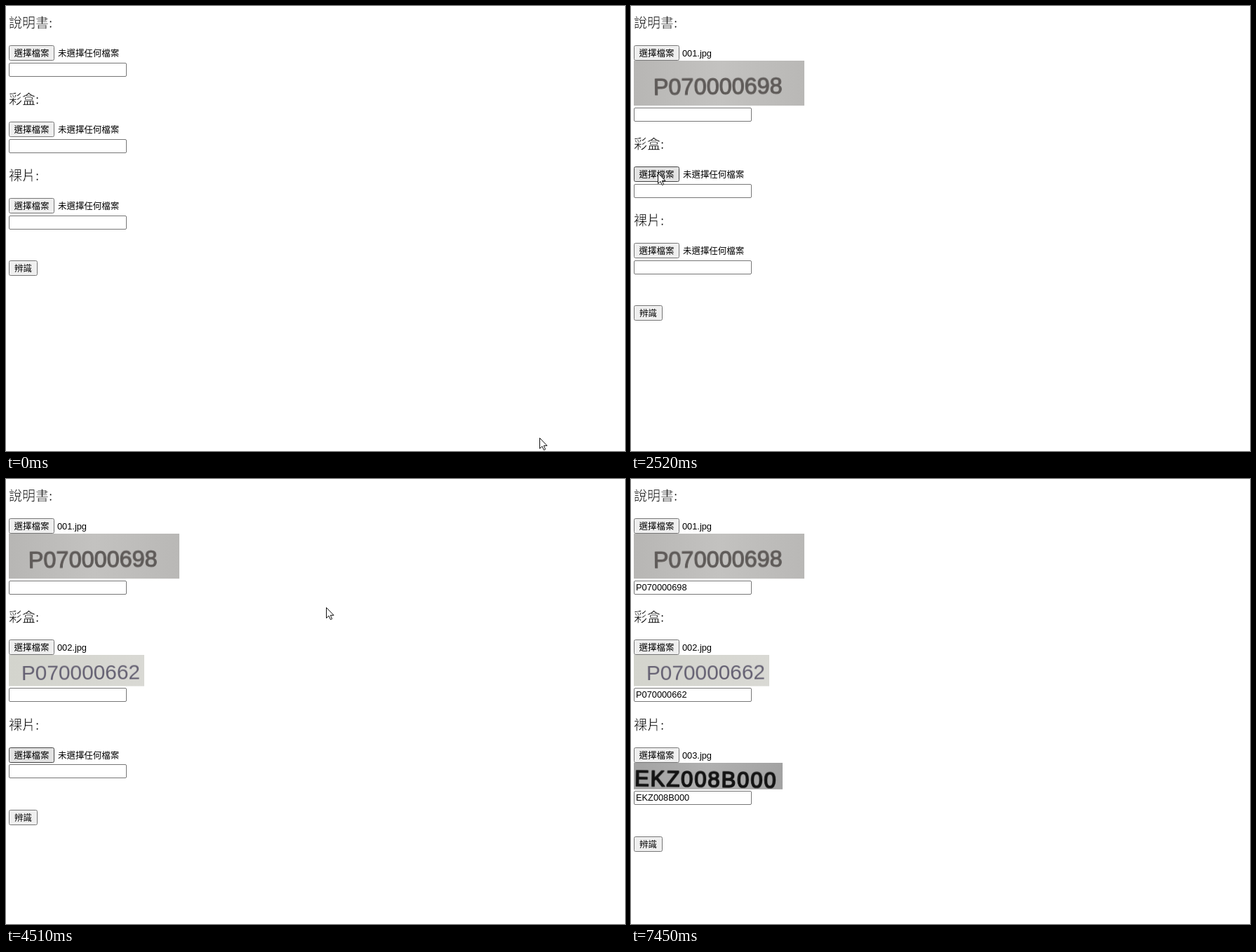
Write an HTML page that moves like this. It is 882x635 px and loops after 8.16 s.

```html
<!DOCTYPE html>
<html lang="zh-Hant">
<head>
<meta charset="utf-8">
<style>
  html, body { margin: 0; width: 100%; height: 100%; overflow: hidden; background: #fff; }
  svg { display: block; width: 882px; height: 635px; }
  text { white-space: pre; }
  .page { font: 12.8px "Liberation Sans", Arial, "Noto Sans CJK TC", sans-serif; }
  .cjk { font: 12.45px "Noto Sans CJK TC", "Noto Sans CJK", sans-serif; }
  .head { font: 300 19px "Noto Sans CJK TC", "Noto Sans CJK", sans-serif; stroke: #fff; stroke-width: .5px; }
  .ui { font: 12px "Open Sans", "Noto Sans CJK TC", "Noto Sans CJK", sans-serif; }
  .photo { font-family: "Liberation Sans", Arial, sans-serif; stroke-linejoin: round; }
  .photo text { filter: blur(.5px); }
</style>
</head>
<body>
<svg viewBox="0 0 882 635">
  <defs>
    <linearGradient id="paper0"><stop stop-color="#b7b6b4"/><stop offset=".5" stop-color="#c3c2c0"/><stop offset="1" stop-color="#b9b8b6"/></linearGradient>
    <linearGradient id="paper1"><stop stop-color="#d3d4cd"/><stop offset="1" stop-color="#d9d9d4"/></linearGradient>
    <linearGradient id="paper2"><stop stop-color="#a3a3a3"/><stop offset=".5" stop-color="#b0b0b0"/><stop offset="1" stop-color="#a2a2a2"/></linearGradient>
    <linearGradient id="shade" x2="0" y2="1"><stop stop-color="#c9c9c9"/><stop offset=".4" stop-color="#e6e6e6"/><stop offset="1" stop-color="#fbfbfb"/></linearGradient>
  </defs>
  <g id="page" class="page"></g>
  <g id="dialog" class="ui"></g>
  <circle id="spot" r="12" fill="#e8de14" opacity=".82"/>
  <path id="cursor" d="M.5.5V15.5L4 12.3 6.4 17.6 8.6 16.6 6.3 11.4H11Z" fill="#fff" stroke="#111"/>
</svg>
<script>
const LOOP = 8160;
const $ = id => document.getElementById(id);

// Each section: press its button, dialog opens, file is picked, dialog closes, result appears
const sections = [
  { title: '說明書:', code: 'P070000698', w: 243, h: 64.2, press: 790, open: 1100, pick: 1560, close: 1800, done: 7220 },
  { title: '彩盒:', code: 'P070000662', w: 193, h: 44.6, press: 2590, open: 2830, pick: 3360, close: 3590, done: 7300 },
  { title: '裸片:', code: 'EKZ008B000', w: 212, h: 37.8, press: 4280, open: 4590, pick: 5130, close: 5400, done: 7450 }
];
const submitPress = 6120;
const clicks = sections.flatMap(s => [[s.press, 80], [s.pick, 70], [s.pick + 150, 70]]).concat([[submitPress, 80]]);

// Pointer tip: time, x, y
const path = [
  [0, 760, 616], [70, 760, 616], [700, 52, 78], [780, 40, 64], [900, 40, 64],
  [1150, 379, 118], [1300, 341, 120], [1450, 310, 78], [1880, 310, 78],
  [2450, 38, 238], [2670, 38, 238], [2830, 398, 172], [2900, 476, 165], [2970, 494, 158],
  [3050, 519, 135], [3120, 519, 135], [3290, 425, 80], [3660, 425, 80],
  [4190, 38, 390], [4340, 38, 390], [4430, 454, 207], [4510, 456, 183], [4580, 456, 183],
  [4700, 459, 162], [4900, 492, 108], [5040, 529, 76], [5430, 529, 76],
  [5900, 26, 546], [6050, 24, 533], [6120, 24, 523], [6300, 24, 523],
  [6780, 841, 616], [6860, 900, 660], [LOOP, 900, 660]
];

const rect = (x, y, w, h, fill, more = '') => `<rect x="${x}" y="${y}" width="${w}" height="${h}" fill="${fill}" ${more}/>`;
const box = (x, y, w, h, fill, line, more = '') => rect(x + .5, y + .5, w - 1, h - 1, fill, `stroke="${line}" ${more}`);
const shape = (d, fill, more = '') => `<path d="${d}" fill="${fill}" ${more}/>`;
const text = (x, y, s, more = '') => `<text x="${x}" y="${y}" ${more}>${s}</text>`;
const uiText = (x, y, s, more = '') => text(x, y, s, (/[一-龥]/.test(s) ? 'style="font-size:11.5px" ' : '') + more);
const stroke = (d, color, w = 1) => shape(d, 'none', `stroke="${color}" stroke-width="${w}"`);

// Lettering on each photo: style, x, baseline, tilt
const prints = [
  ['font-size="32.4" fill="#5f5b59" stroke="#5f5b59" stroke-width="1.1"', 28, 49.3, -.6],
  ['font-size="29.8" fill="#646072"', 18, 36, -.5],
  ['font-size="31" fill="#141414" stroke="#141414" stroke-width="1.7" letter-spacing="1.9"', 1, 32.5, .8]
];

function photo(i, x, y, scale = 1) {
  const { w, h, code } = sections[i];
  const [style, tx, ty, tilt] = prints[i];
  return `<g class="photo" transform="translate(${x} ${y}) scale(${scale})">` +
    rect(0, 0, w, h, `url(#paper${i})`) +
    text(tx, ty, code, `${style} transform="rotate(${tilt} ${tx} ${ty})"`) + '</g>';
}

function button(x, y, w, label, hot) {
  return box(x, y, w, 22, hot ? '#e3e3e3' : '#efefef', hot ? '#444' : '#767676', 'rx="2"') +
    text(x + w / 2, y + 16, label, 'class="cjk" text-anchor="middle"');
}

function drawPage(t) {
  let y = 0, out = '';
  const at = dy => Math.round(y + dy);
  sections.forEach((s, i) => {
    const loaded = t >= s.close + 80;
    const hot = t >= s.press - 120 && t < s.close;
    out += text(4, at(31), s.title, 'class="head"') + button(4, at(56), 65, '選擇檔案', hot);
    out += loaded ? text(73, at(72), `00${i + 1}.jpg`) : text(74, at(72), '未選擇任何檔案', 'class="cjk"');
    if (loaded) {
      out += photo(i, 4, at(78));
      y += s.h;
    }
    out += box(4, at(80.7), 168, 20, '#fff', '#767676', 'rx="1.5"');
    if (t >= s.done) out += text(7, at(80.7) + 14, s.code);
    y += 108.9;
  });
  return out + button(4, at(36.4), 41, '辨識', t >= 6050 && t < 6320);
}

const drive = y => rect(36, y + 1, 12, 5, '#4a4a4a', 'rx="1"') + rect(45, y + 3, 2, 1, '#7ddc7d');
const folder = y => rect(36, y - 8, 11, 14, '#ffd869', 'rx="1"') + rect(36, y - 8, 2, 14, '#efb93a');
const pin = y => `<g transform="translate(226 ${y}) rotate(45)">` +
  shape('M-3-5H3V-4H2V0L4 2H-4L-2 0V-4H-3Z', '#8b97a3') + stroke('M0 2V6', '#8b97a3') + '</g>';

const places = [
  [7, '資訊部周會', y => folder(y) + pin(y)],
  [30, 'oqc_image', y => folder(y) + rect(37, y + 5, 9, 2, '#3bb54a') + rect(40, y + 4, 3, 4, '#3bb54a') + pin(y)],
  [60, '本機', y => box(26, y - 6, 16, 11, '#4db8f0', '#3b7fa8') + rect(30, y + 6, 8, 1.5, '#6a8598')],
  [83, '3D 物件', y => shape(`M35 ${y - 4}L42 ${y - 7} 49 ${y - 4} 42 ${y - 1}Z`, '#8fe0ee') +
    shape(`M35 ${y - 4}L42 ${y - 1}V${y + 7}L35 ${y + 4}Z`, '#25b0cf') + shape(`M49 ${y - 4}L42 ${y - 1}V${y + 7}L49 ${y + 4}Z`, '#1284a8')],
  [106, '下載', y => shape(`M39 ${y - 7}H45V${y - 1}H49L42 ${y + 7} 35 ${y - 1}H39Z`, '#2b82d9')],
  [128, '文件', y => box(36, y - 7, 12, 15, '#fff', '#6f8798') + stroke(`M38 ${y - 3.5}H46M38 ${y - .5}H46M38 ${y + 2.5}H46M38 ${y + 5.5}H46`, '#3f97d0')],
  [151, '音樂', y => `<ellipse cx="39.5" cy="${y + 5}" rx="3.4" ry="2.7" fill="#1484d6"/>` + stroke(`M42 ${y + 5}V${y - 7}Q43 ${y - 3} 46 ${y - 1}V${y + 2}`, '#1484d6', 1.8)],
  [174, '桌面', y => box(34, y - 6, 15, 12, '#149df0', '#0a66ae')],
  [197, '圖片', y => box(34, y - 6, 15, 12, '#fff', '#8a949c') + rect(36, y - 4, 11, 4, '#7cc4ef') + shape(`M36 ${y + 4}V${y}L40 ${y - 2} 47 ${y + 2}V${y + 4}Z`, '#3c7fa0')],
  [219, '影片', y => rect(35, y - 6, 13, 14, '#2e2e35') + rect(38, y - 5, 7, 5, '#5a86c4') + rect(38, y + 1, 7, 5, '#9a7048')],
  [242, 'Velmora (C:)', y => drive(y) + rect(34, y - 5, 6, 6, '#12a5e8')],
  [265, 'DATA (D:)', drive],
  [288, 'CD 光碟機 (F:)', y => `<circle cx="43" cy="${y - 2}" r="4" fill="#ddd" stroke="#777" stroke-width="2"/>` + drive(y)],
  [311, 'PortBin (\\\\10.4.31.7) (Z:)', y => drive(y - 4) + rect(36, y + 4, 12, 2, '#32b34a') + rect(40, y + 3, 4, 5, '#32b34a')]
];

const chevron = (x, y) => stroke(`M${x - 4} ${y - 2}L${x} ${y + 2}L${x + 4} ${y - 2}`, '#444', 1.1);

function drawDialog(t) {
  const now = sections.findIndex(s => t >= s.open && t < s.close);
  if (now < 0) return '';
  const { pick } = sections[now];
  const picked = t >= pick;
  let out = rect(0, 0, 4, 410, '#dedede') + rect(0, 403, 882, 20, 'url(#shade)') +
    rect(3, 0, 879, 403, '#f2f2f2') + stroke('M3.5 0V402.5H882', '#707070') +
    rect(19, 0, 216, 323, '#fff') + rect(260, 0, 622, 322, '#fff');

  // Folder pane
  out += rect(4, 254, 231, 22, '#d9d9d9') + rect(235, 0, 15, 330, '#f4f4f4') + rect(235, 125, 15, 172, '#c8c8c8') +
    stroke('M238.5 7L242 3.5 245.5 7M238.5 320L242 323.5 245.5 320', '#444', 1.6);
  for (const [y, name, icon] of places) out += icon(y) + uiText(name === '本機' ? 47 : 54, y + 4, name);

  // Files
  sections.forEach((s, i) => {
    const x = Math.round(267 + i * 104.5), scale = 87 / s.w, y = 92 - s.h * scale;
    if (i === now && picked) out += box(x, 2, 100, 110, '#cce8ff', '#99d1ff');
    else if (i === now && t >= pick - 130) out += rect(x, 2, 100, 110, '#e5f3ff');
    out += rect(x + 7, y + 1, 88, 93 - y, '#999', 'opacity=".4"') + photo(i, x + 6, y, scale) +
      uiText(x + 50, 106, `00${i + 1}.jpg`, 'text-anchor="middle"');
  });

  // File name row and buttons
  out += uiText(192, 353, '檔案名稱(N):', 'text-anchor="end"') +
    box(197, 338, 495, 23, '#fff', picked ? '#7a7a7a' : '#0078d7') + chevron(684, 350) +
    (picked ? uiText(201, 354, `00${now + 1}.jpg`) : rect(201, 343, 1, 14, '#000')) +
    box(703, 338, 179, 22, '#e4e4e4', '#adadad') + uiText(708, 353, '所有檔案 (*.*)') + chevron(873, 350) +
    rect(706, 368, 79, 21, '#e1e1e1', 'stroke="#0078d7" stroke-width="2"') + uiText(745.5, 382, '開啟(O)', 'text-anchor="middle"') +
    box(799, 367, 82, 23, '#e1e1e1', '#adadad') + uiText(840, 382, '取消', 'text-anchor="middle"');
  return out;
}

function pointer(t) {
  const i = path.findIndex(p => p[0] > t);
  const [t0, x0, y0] = path[i - 1], [t1, x1, y1] = path[i];
  let k = (t - t0) / (t1 - t0);
  if (t1 - t0 > 300) k = k * k * (3 - 2 * k);
  return [x0 + (x1 - x0) * k, y0 + (y1 - y0) * k];
}

const shown = {};
function put(id, html) {
  if (shown[id] !== html) $(id).innerHTML = shown[id] = html;
}

const start = performance.now();
function frame() {
  const t = (performance.now() - start) % LOOP;
  const at = `translate(${pointer(t)})`;
  put('page', drawPage(t));
  put('dialog', drawDialog(t));
  $('cursor').setAttribute('transform', at);
  $('spot').setAttribute('transform', at);
  $('spot').style.display = clicks.some(([from, len]) => t >= from && t < from + len) ? '' : 'none';
  requestAnimationFrame(frame);
}
frame();
</script>
</body>
</html>
```
